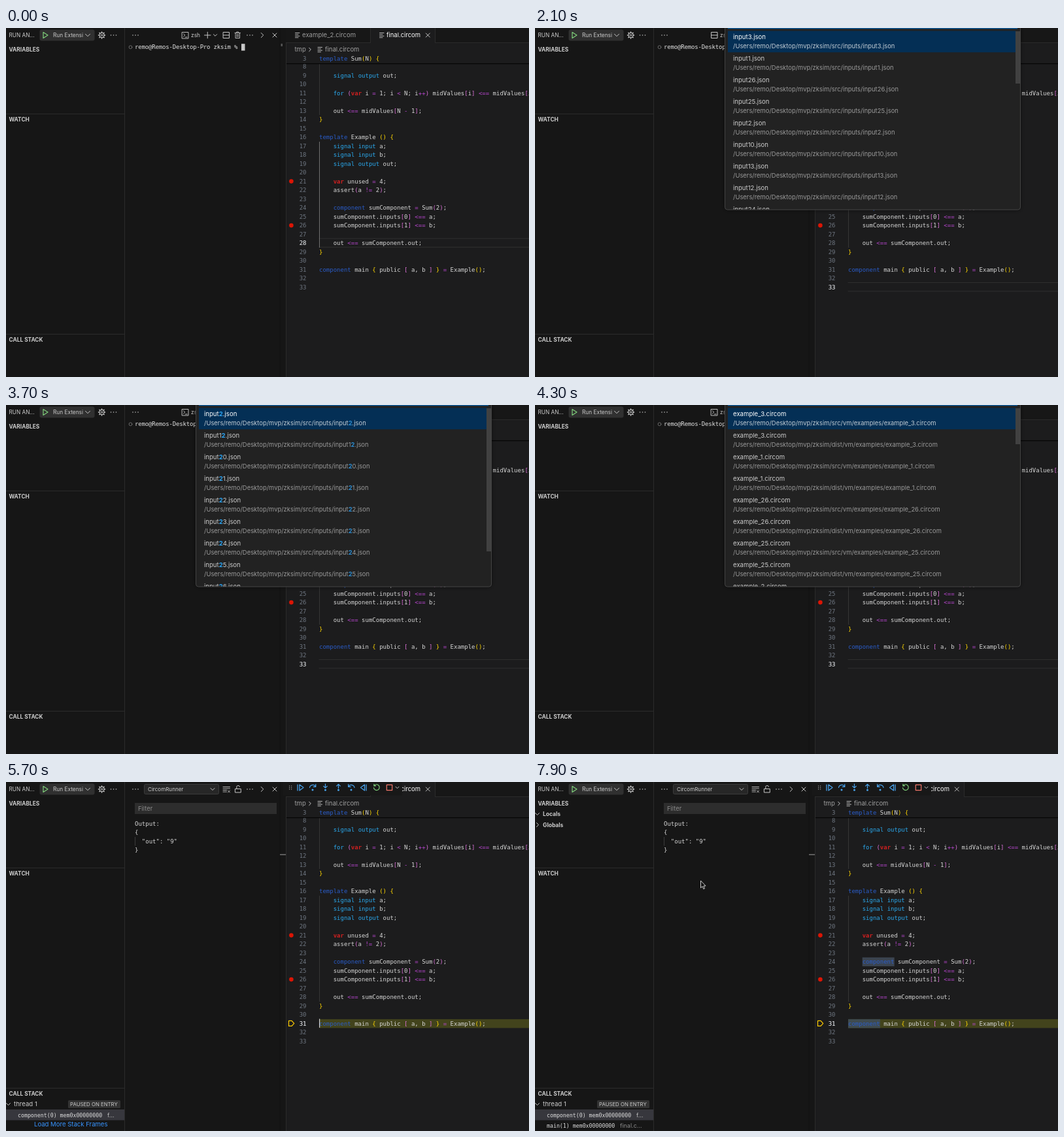
These frames come from a looping animation (800 px wide and 534 px high, 8 s). An HTML page:

```html
<!DOCTYPE html>
<html lang="en">
<head>
<meta charset="utf-8">
<title>Debugger session</title>
<style>
html, body { margin: 0; width: 100%; height: 100%; overflow: hidden; background: #161616; }
svg { display: block; }
text { font-family: Inter, "Open Sans", sans-serif; white-space: pre; }
.mono { font-family: "DejaVu Sans Mono", "Liberation Mono", monospace; }
.line { fill: none; stroke: #c5c5c5; stroke-linecap: round; stroke-linejoin: round; }
.blue { stroke: #4aa3ec; }
[data-on] { display: none; }
</style>
</head>
<body>
<svg id="stage" width="800" height="534" viewBox="0 0 800 534"></svg>
<script>
(() => {
const LOOP = 8000, OPEN = 1900, PICKED = 3800, RUN = 5400;
const esc = s => s.replace(/&/g, '&amp;').replace(/</g, '&lt;');

// Drawing helpers: each returns SVG markup.
const rect = (x, y, w, h, fill, more = '') =>
  `<rect x="${x}" y="${y}" width="${w}" height="${h}" fill="${fill}" ${more}/>`;
const label = (x, y, s, size = 9.5, fill = '#cccccc', more = '') =>
  `<text x="${x}" y="${y}" font-size="${size}" fill="${fill}" ${more}>${s}</text>`;
const mono = (x, y, s, fill = '#d6d6d6', size = 9, more = '') =>
  label(x, y, s, size, fill, 'class="mono" ' + more);
const line = (d, more = '', cls = '') =>
  `<path class="line ${cls}" d="${d}" ${more}/>`;
const on = (spans, ...parts) => `<g data-on="${spans}">${parts.join('')}</g>`;
const bold = 'font-weight="700"';

// Icons
const dots = (x, y = 11) => [-4, 0, 4].map(d =>
  `<circle cx="${x + d}" cy="${y}" r=".8" fill="#c5c5c5"/>`).join('');
const down = (x, y, r = 3.5) => line(`M${x - r} ${y - r / 2}l${r} ${r}l${r} ${-r}`);
const right = (x, y, r = 3.5) => line(`M${x - r / 2} ${y - r}l${r} ${r}l${-r} ${r}`);
const cross = (x, y) => line(`M${x - 3} ${y - 3}l6 6m0 -6l-6 6`);
const listIcon = (x, y) => line(`M${x} ${y - 3.5}h6.5m-6.5 2.4h4.5m-4.5 2.4h6.5m-6.5 2.4h4.5`, 'stroke-width=".9"');
const splitIcon = x => line(`M${x - 4.5} 6.5h9v9h-9zm0 4.5h9`);
const gear = (x, y) => {
  let teeth = '';
  for (let i = 0; i < 8; i++) {
    const a = i * Math.PI / 4, c = Math.cos(a), s = Math.sin(a);
    teeth += `M${x + 3.8 * c} ${y + 3.8 * s}L${x + 5 * c} ${y + 5 * s}`;
  }
  return `<circle class="line" cx="${x}" cy="${y}" r="3.7"/><circle class="line" cx="${x}" cy="${y}" r="1.3"/>` +
    line(teeth, 'stroke-width="1.6"');
};

// Code
const source = {
  9: '    signal output out;',
  11: '    for (var i = 1; i < N; i++) midValues[i] <== midValues[i - 1] + inputs[i];',
  13: '    out <== midValues[N - 1];',
  14: '}',
  16: 'template Example () {',
  17: '    signal input a;',
  18: '    signal input b;',
  19: '    signal output out;',
  21: '    var unused = 4;',
  22: '    assert(a != 2);',
  24: '    component sumComponent = Sum(2);',
  25: '    sumComponent.inputs[0] <== a;',
  26: '    sumComponent.inputs[1] <== b;',
  28: '    out <== sumComponent.out;',
  29: '}',
  31: 'component main { public [ a, b ] } = Example();'
};
const tokens = /(\b(?:template|component)\b|\b(?:signal|input|output|for)\b|\bvar\b|<==|!=|\+\+|[=<+-]|[()[\]{}])/;
const brackets = ['#ffd700', '#da70d6', '#179fff'];
const baseline = n => 75.6 + 13.5 * (n - 9);
const rowTop = n => baseline(n) - 10;

function paint(code) {
  let depth = code[0] === ' ' ? 1 : 0;
  const colour = tok => {
    if (/^(template|component)$/.test(tok)) return '#2a5cc8';
    if (/^(signal|input|output|for)$/.test(tok)) return '#2aa9ee';
    if (tok === 'var') return '#cf2020';
    if (/^[([{]$/.test(tok)) return brackets[depth++ % 3];
    if (/^[)\]}]$/.test(tok)) return brackets[depth = Math.max(0, depth - 1)];
    return '#b946d0';
  };
  return code.split(tokens).map((tok, i) => i % 2
    ? `<tspan fill="${colour(tok)}"${tok === 'var' ? ' ' + bold : ''}>${esc(tok)}</tspan>`
    : esc(tok)).join('');
}
const lineNo = (n, y, fill) => mono(459.5, y, n, fill, 9, 'text-anchor="end"');
const activeLine = n => lineNo(n, baseline(n), '#dddddd');
const lineBox = n => line(`M479 ${rowTop(n)}H800M479 ${rowTop(n) + 13.2}H800`, 'style="stroke:#303030"');
const guide = (from, to, fill) => rect(479, from, 1, to - from, fill);

function codeRows() {
  let out = '';
  for (let n = 8; n <= 33; n++) {
    out += lineNo(n, baseline(n), '#6e7681');
    if (source[n]) out += mono(479, baseline(n), paint(source[n]));
  }
  return out;
}

function sidebar() {
  const head = (y, s) => label(4.5, y, s, 8.4, '#cccccc', bold);
  const play = line('M57 6.5L64 11L57 15.5z', 'style="stroke:#7fcf7a" stroke-width="1.2"');
  return rect(0, 131, 181, 1, '#2b2b2b') + rect(0, 468, 181, 1, '#2b2b2b') +
    label(4.5, 14, 'RUN AN...', 8.25) +
    rect(51.5, 2.5, 84, 17, '#303030', 'rx="3"') + play +
    label(72, 14.3, 'Run Extensi', 8.3) + down(125, 11) + gear(146.5, 11) + dots(164.5) +
    head(35.5, 'VARIABLES') + head(142.7, 'WATCH') + head(479.6, 'CALL STACK') +
    on(`5800 ${LOOP}`,
      down(3.5, 49, 3), label(12, 52, 'Locals', 8.5, '#cccccc', bold),
      right(4, 65.5, 3), label(12, 68.5, 'Globals', 8.5, '#cccccc', bold)) +
    on(`${RUN + 200} ${LOOP}`,
      down(3.5, 493, 3), label(12, 496.3, 'thread 1', 9.6),
      rect(95, 487, 80, 12, '#333333', 'rx="1.5"'), label(98, 496, 'PAUSED ON ENTRY', 7.8),
      rect(0, 501, 181, 16.5, '#37373d'),
      mono(18, 512.6, 'component(0) mem0x00000000', '#dddddd', 8.25),
      label(155, 512.6, 'f...', 9, '#bbbbbb')) +
    on(`${RUN + 200} 6200`, label(43, 527.4, 'Load More Stack Frames', 9.55, '#3794ff')) +
    on(`6200 ${LOOP}`,
      mono(18, 529, 'main(1) mem0x00000000', '#dddddd', 8.25),
      label(130, 529, 'final.c...', 9, '#8c8c8c'));
}

function panel() {
  const shared = dots(198) + dots(373) + right(392, 11) + cross(411, 11);
  const trash = line('M350 7.5h8.5m-5.8 0v-1.5h3v1.5m-4.7 0v8h6.5v-8m-4.2 2v4m2 -4v4', 'stroke-width=".9"');
  const shell = line('M269.5 6.5h9.5v9.5h-9.5zm2 2.3l2.3 2.2l-2.3 2.2m3 .8h2.6', 'stroke-width=".95"');
  const prompt = 'remo@Remos-Desktop-Pro zksim %';
  const terminal = on(`0 ${RUN}`,
    on(`0 ${OPEN} 2800 ${RUN}`, shell), on(`${OPEN} 2800`, splitIcon(274.5)),
    label(283, 14.3, 'zsh', 8.4), line('M303.5 11h9.5m-4.75 -4.75v9.5'), down(320, 11, 2.6),
    splitIcon(337), trash,
    '<circle class="line" cx="190.5" cy="29.3" r="2.4" style="stroke:#6b6b6b"/>',
    mono(197, 32.4, prompt, '#e2e2e2', 9, 'letter-spacing="-.175"'),
    on('0 500', rect(360, 24.2, 5.5, 10.4, '#c8c8c8')),
    on(`500 ${RUN}`, rect(360.5, 24.7, 4.8, 9.6, 'none', 'stroke="#b8b8b8"')),
    rect(420.5, 24, 2.5, 4, '#555555'));
  const clear = line('M332 7.5h10.5m-10.5 2.5h10.5m-10.5 2.5h5.5m-5.5 2.5h5.5m2 -2l3 3m0 -3l-3 3', 'stroke-width=".9"');
  const lock = line('M350.8 10.5h8.5v5.5h-8.5zm2 0v-2.5a2.3 2.3 0 0 1 4.6 -.6');
  const rows = ['Output:', '{', '  "out": "9"', '}'];
  const output = on(`${RUN} ${LOOP}`,
    rect(211.5, 3.5, 114, 15, '#272727', 'rx="2" stroke="#3c3c3c"'),
    label(217, 14, 'CircomRunner', 8.05), down(316, 11, 3), clear, lock,
    rect(197, 32, 217, 17, '#2d2d2d'), label(202, 44, 'Filter', 9.4, '#8a8a8a'),
    rect(197, 84, 1, 13.5, '#3a3a3a'),
    ...rows.map((s, i) => mono(197, 66.8 + 13.5 * i, s)),
    rect(419, 110.5, 9, 1.2, '#8a8a8a'));
  return rect(181, 0, 1, 534, '#2b2b2b') + rect(418.5, 0, 1, 534, '#101010') + shared + terminal + output;
}

function debugBar() {
  const grip = [5.5, 8, 10.5].map(y => rect(433, y, 1.2, 1.2, '#999') + rect(436, y, 1.2, 1.2, '#999')).join('');
  const dot = (x, y) => `<circle cx="${x}" cy="${y}" r="1.5" fill="#4aa3ec"/>`;
  const blue = d => line(d, 'stroke-width="1.25"', 'blue');
  return rect(424, 0, 182, 20.5, '#181818') + grip +
    blue('M446 4v9m3 -9l6 4.5l-6 4.5z') +
    blue('M464.5 8.5a4.8 4.8 0 0 1 9 -1.4m.3 -3.4v3.6h-3.6') + dot(469, 12) +
    blue('M488.5 3v6m-2.8 -2.6l2.8 2.7l2.8 -2.7') + dot(488.5, 12.3) +
    blue('M508.5 9.5v-6m-2.8 2.6l2.8 -2.7l2.8 2.7') + dot(508.5, 12.3) +
    blue('M533 8.5a4.8 4.8 0 0 0 -9 -1.4m-.3 -3.4v3.6h3.6') + dot(528, 12) +
    blue('M551 4v9m-2.5 -9l-6 4.5l6 4.5z') +
    line('M563.5 5.3a4.4 4.4 0 1 1 -1 3.6m.4 -5.6v2.6h2.6', 'style="stroke:#7fcf7a" stroke-width="1.2"') +
    line('M582.3 4.3h8.4v8.4h-8.4z', 'style="stroke:#f0766a" stroke-width="1.2"') + down(598.5, 8.5, 2.5);
}

function editor() {
  const tabs = rect(428, 0, 372, 22, '#171717') + rect(428, 22, 372, 1, '#2b2b2b') +
    rect(557, 0, 1, 22, '#2b2b2b') + rect(558, 0, 98, 23, '#1c1c1d') + rect(656, 0, 1, 22, '#2b2b2b') +
    listIcon(442.5, 11) + label(453, 14.4, 'example_2.circom', 9.6, '#9d9d9d') +
    listIcon(571.5, 11) + label(582, 14.4, 'final.circom', 9.45, '#ffffff') + cross(645.3, 11);
  const crumbs = label(441.5, 36, 'tmp', 9.5, '#a0a0a0') + right(465, 33, 2.7) +
    listIcon(477, 33) + label(488, 36, 'final.circom', 9.5, '#a0a0a0');
  const sticky = rect(429, 40, 371, 14, '#1c1c1d') + lineNo(3, 50.4, '#6e7681') +
    mono(479, 50.4, paint('template Sum(N) {')) + rect(429, 54, 371, 1.2, '#050505');
  const stops = [21, 26].map(n => `<circle cx="436.4" cy="${baseline(n) - 3}" r="3.3" fill="#dc1505"/>`).join('');
  const caret = n => rect(479, rowTop(n) - .2, 1.2, 13.5, '#d0d0d0');
  const band = (n, x, w, fill) => rect(x, rowTop(n) + .3, w, 13.5, fill);
  const pause = on(`${RUN} ${LOOP}`, band(31, 479, 321, '#42431c')) +
    on(`6200 ${LOOP}`, band(31, 479, 49, '#3f4b50'), band(24, 500.7, 49, '#3b4450'));
  const arrow = line(`M432.5 ${baseline(31) - 7.2}h4.6l3.6 4l-3.6 4h-4.6z`, 'style="stroke:#ffcc00" stroke-width="1.2"');
  return rect(428, 0, 372, 534, '#1c1c1d') + rect(428, 0, 1, 534, '#2b2b2b') +
    pause + on('0 500', lineBox(28)) + on(`${OPEN} ${RUN}`, lineBox(33)) +
    guide(54, 133, '#363636') + guide(174, 336, '#363636') + on('0 500', guide(174, 336, '#707070')) +
    codeRows() + stops +
    on('0 500', activeLine(28)) + on(`500 ${RUN}`, activeLine(33)) +
    on(`${RUN} ${LOOP}`, activeLine(31), arrow) +
    on(`500 1000 1500 ${OPEN}`, caret(33)) + on('5400 5900 6400 6900 7400 7900', caret(31)) +
    tabs + crumbs + sticky + on(`${RUN} ${LOOP}`, debugBar());
}

// Quick-pick list
const home = '/Users/remo/Desktop/mvp/zksim/';
const inputs = ids => ids.map(n => [`input${n}.json`, 'src/inputs/']);
const circuits = ids => ids.flatMap(n => ['src', 'dist'].map(d => [`example_${n}.circom`, d + '/vm/examples/']));

function picker(spans, items, barEnd, typed) {
  const mark = (s, fill) => typed ? s.replace('2', `<tspan fill="${fill}" ${bold}>2</tspan>`) : s;
  const rows = items.slice(0, 9).map(([name, dir], i) => {
    const y = 33.1 * i;
    return label(303, 16.6 + y, mark(name, '#2aa5f5'), 9.6, i ? '#cccccc' : '#ffffff') +
      label(303, 30.6 + y, home + dir + mark(name, '#2a8bd0'), 9.42, i ? '#999999' : '#c3ccd4');
  }).join('');
  return on(spans,
    rect(290.5, -10, 452, 288, '#212121', 'rx="4" stroke="#434343" filter="url(#shade)"'),
    rect(295, 0, 443, 1.2, '#0a5fa5'), rect(295, 4.5, 440, 32.7, '#042f55'),
    `<g clip-path="url(#list)">${rows}</g>`,
    rect(735, 5, 7, barEnd - 5, '#414141'));
}
const order = [3, 1, 26, 25, 2, 10, 13, 12, 24];
const pickers =
  picker(`${OPEN} 2800`, inputs(order), 85) +
  picker(`2800 ${PICKED}`, inputs([2, 12, 20, 21, 22, 23, 24, 25, 26]), 224, true) +
  picker(`${PICKED} 4700`, circuits(order), 60) +
  picker(`4700 ${RUN}`, circuits([2, 12, 20, 21, 22]), 114, true);

const stage = document.getElementById('stage');
stage.innerHTML = `<defs>
  <clipPath id="list"><rect x="291" y="0" width="444" height="277.5"/></clipPath>
  <filter id="shade" x="-5%" y="-5%" width="110%" height="112%"><feDropShadow dx="0" dy="0" stdDeviation="3" flood-opacity=".5"/></filter>
  </defs>` + rect(0, 0, 800, 534, '#161616') + sidebar() + panel() + editor() + pickers +
  '<path id="mouse" d="M0 0V11L2.6 8.7L4.3 12.7L6 12L4.4 8H7.6z" fill="#111" stroke="#dedede" stroke-width=".9"/>';

// Pointer path: [time, x, y]; hidden while typing.
const visits = [
  [[100, 721, 519], [300, 650, 391], [OPEN, 650, 391]],
  [[6500, 650, 391], [7300, 275, 180], [7700, 253.5, 151], [LOOP, 253.5, 151]]
];
function pointer(t) {
  const keys = visits.find(v => t >= v[0][0] && t < v[v.length - 1][0]);
  if (!keys) return null;
  const i = keys.findIndex(k => k[0] > t);
  const [t0, x0, y0] = keys[i - 1], [t1, x1, y1] = keys[i];
  const p = (t - t0) / (t1 - t0), e = p * p * (3 - 2 * p);
  return [x0 + (x1 - x0) * e, y0 + (y1 - y0) * e];
}

const mouse = document.getElementById('mouse');
const timed = [...stage.querySelectorAll('[data-on]')].map(el => [el, el.dataset.on.split(' ').map(Number)]);
function draw() {
  const now = performance.now() % LOOP, t = Math.floor(now / 100) * 100;
  for (const [el, spans] of timed) {
    const shown = spans.some((s, i) => i % 2 === 0 && now >= s && now < spans[i + 1]);
    el.style.display = shown ? 'inline' : 'none';
  }
  const at = pointer(t);
  mouse.style.display = at ? 'inline' : 'none';
  if (at) mouse.setAttribute('transform', `translate(${at})`);
  requestAnimationFrame(draw);
}
draw();
})();
</script>
</body>
</html>
```
